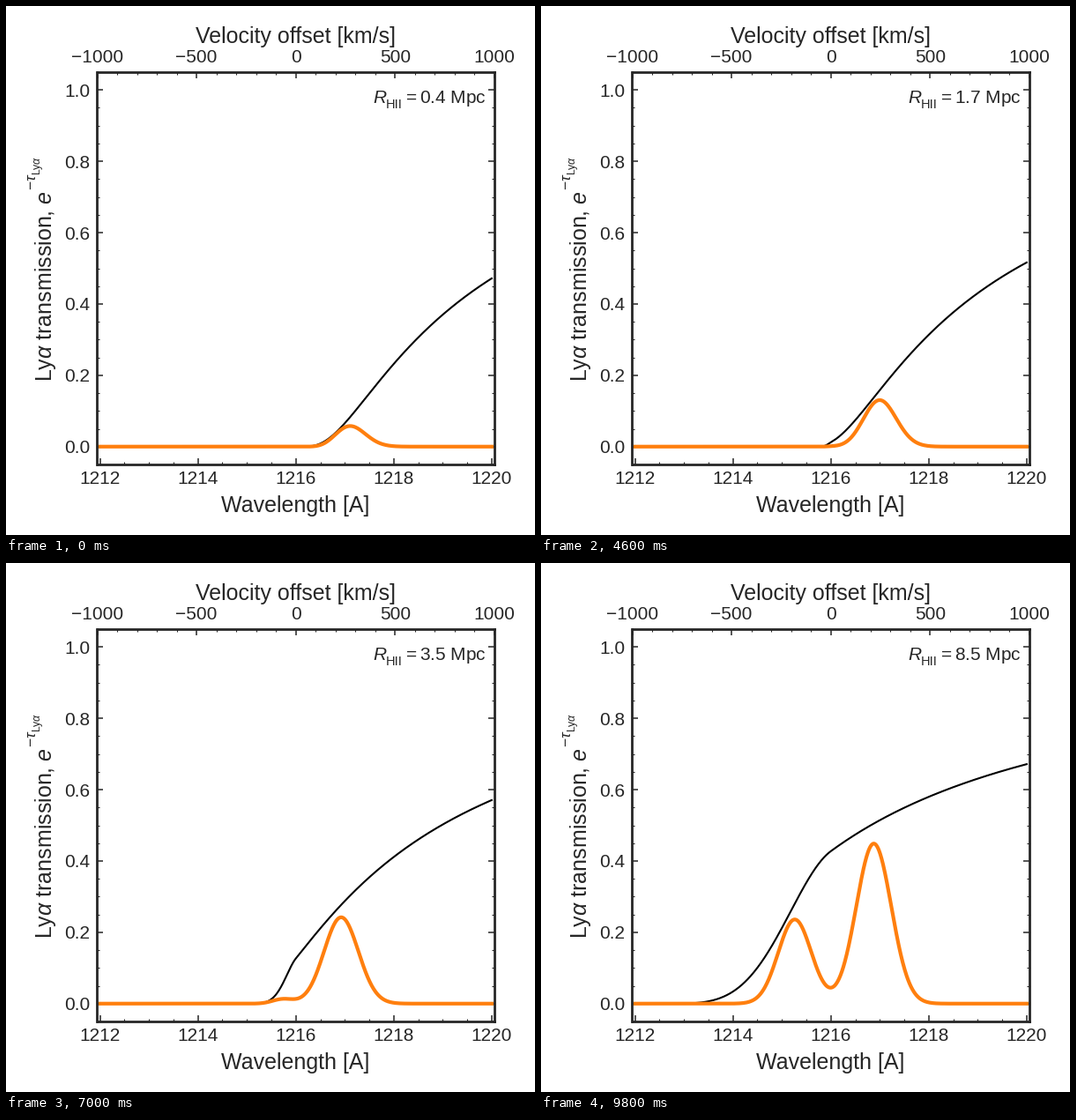
These frames come from a looping animation (600 px wide and 600 px high, 10 s). A matplotlib script:

```python
import numpy as np
import matplotlib.pyplot as plt
from matplotlib.animation import FuncAnimation
from matplotlib.ticker import AutoMinorLocator, MultipleLocator

SIZE, DPI = 600, 100
FRAMES, INTERVAL = 50, 200
LEFT, RIGHT, TOP, BOTTOM = 103.5, 554, 75, 520
INK = "0.15"
LYA = 1216.0
C_KMS = 2.998e5

plt.rcParams.update({
    "font.family": "Liberation Sans",
    "mathtext.fontset": "custom",
    "mathtext.rm": "Liberation Sans",
    "mathtext.it": "Liberation Sans:italic",
    "text.color": INK,
    "axes.edgecolor": INK,
    "axes.linewidth": 2,
    "axes.unicode_minus": True,
})

wave = np.linspace(1212, 1220, 800)
offset = wave - LYA


def bubble_radius(frame):
    """Ionised bubble radius in Mpc, growing exponentially."""
    return 0.396 * np.exp(0.0625 * frame)


def transmission(radius):
    """Damping wing of the neutral gas plus residual absorption in the bubble."""
    gap = np.maximum(offset + 0.437 * radius, 1e-3)
    wing = 3.216 * (1 / gap - 0.006)
    residual = 230 / radius**3 * np.minimum(offset, 0) ** 2
    return np.exp(-wing - residual)


def emission(center=0.857, sigma=0.36, height=0.89):
    """Symmetric double-peaked line."""
    def peak(c):
        return np.exp(-((offset - c) ** 2) / (2 * sigma**2))
    return height * (peak(center) + peak(-center))


def put(x, y, text, size, **kw):
    """Place text by its baseline, in pixels from the top left."""
    return fig.text(x / SIZE, 1 - y / SIZE, text, fontsize=size,
                    va="baseline", **kw)


def put_up(x, y, text, size):
    """Text that reads upwards, starting at y."""
    return put(x, y, text, size, ha="left", rotation=90,
               rotation_mode="anchor")


def style_ticks(axes, axis, step, pad=5, **sides):
    which = axes.xaxis if axis == "x" else axes.yaxis
    which.set_major_locator(MultipleLocator(step))
    which.set_minor_locator(AutoMinorLocator())
    axes.tick_params(axis=axis, which="both", direction="in", color=INK,
                     labelcolor=INK, **sides)
    axes.tick_params(axis=axis, which="major", length=5, width=1.1,
                     pad=pad, labelsize=15)
    axes.tick_params(axis=axis, which="minor", length=2.5, width=0.8)


fig = plt.figure(figsize=(SIZE / DPI, SIZE / DPI), dpi=DPI, facecolor="white")
ax = fig.add_axes([LEFT / SIZE, 1 - BOTTOM / SIZE,
                   (RIGHT - LEFT) / SIZE, (BOTTOM - TOP) / SIZE])
half = LYA * 1000 / C_KMS
ax.set_xlim(LYA - half, LYA + half)
ax.set_ylim(-0.05, 1.05)
style_ticks(ax, "x", 2)
style_ticks(ax, "y", 0.2, pad=5.7, left=True, right=True)

top = ax.twiny()
top.set_xlim(-1000, 1000)
style_ticks(top, "x", 500)
for spine in top.spines.values():
    spine.set_visible(False)

mid = (LEFT + RIGHT) / 2
put(mid, 42, "Velocity offset [km/s]", 18, ha="center")
put(mid - 0.5, 574, "Wavelength [A]", 18, ha="center")

# Scripts sit further from the baseline than mathtext puts them.
put_up(52, 425.5, r"Ly$\alpha$ transmission, $e$", 18)
put_up(34.5, 209, r"$-\tau$", 12.6)
put_up(39.5, 192, r"Ly$\alpha$", 8.82)
put(416, 110, "R", 15, style="italic")
put(430.5, 116, "HII", 10.5)
label = put(544.5, 110, "", 15, ha="right")

profile = emission()
curve, = ax.plot([], [], color="black", lw=1.5)
line, = ax.plot([], [], color="#ff7f0e", lw=3)


def update(frame):
    radius = bubble_radius(frame)
    trans = transmission(radius)
    curve.set_data(wave, trans)
    line.set_data(wave, trans * profile)
    label.set_text(rf"$= {radius:.1f}$ Mpc")
    return curve, line, label


anim = FuncAnimation(fig, update, frames=FRAMES, interval=INTERVAL,
                     init_func=lambda: update(0), repeat=True)
plt.show()
```
